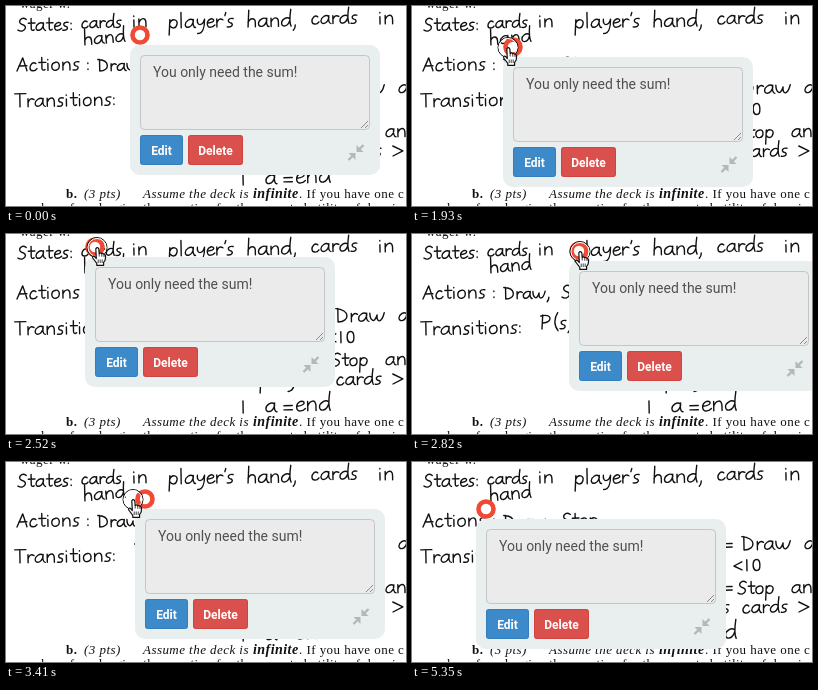
An HTML page with a canvas for the animation above (5.44 s loop, 400 px wide and 200 px high).

```html
<!DOCTYPE html>
<html lang="en">
<head>
<meta charset="utf-8">
<title>Draggable note</title>
<style>
html, body { margin: 0; width: 100%; height: 100%; overflow: hidden; background: #fff; }
canvas { display: block; width: 400px; height: 200px; }
</style>
</head>
<body>
<canvas id="stage" width="400" height="200"></canvas>
<script>
const ctx = document.getElementById('stage').getContext('2d');
const LOOP = 5440;
const STEP = 148;
const PRESS = 1640;
const RELEASE = 4160;
const SERIF = '"Liberation Serif", serif';
const SANS = 'Roboto, sans-serif';

// Pen strokes: advance and path, baseline at y = 0
const bowl = 'M8-7C5-10 0-6 0-3C0 1 6 1 8-6';
const pen = {
  a: [11, bowl + 'M8-8C7-4 8 0 10 0'],
  c: [9, 'M6-7C3-10 0-5 0-3C0 1 5 1 7-2'],
  d: [11, bowl + 'M9-16C8-10 7-4 9 0'],
  e: [9, 'M1-4C10-5 7-9 4-8C-1-6 0 1 4 0Q6 0 8-2'],
  h: [11, 'M2-16L1 0M1-4C3-9 8-9 8-4V0'],
  i: [5, 'M1-7V0M1-11V-10.5'],
  l: [5, 'M1-15V0'],
  n: [11, 'M1-8V0M1-4C3-9 8-10 8-4V0'],
  o: [10, 'M4-8C-2-7-1 1 4 0C9-1 8-9 4-8'],
  p: [11, 'M1-8L0 7M1-5C3-10 9-8 8-4C7 1 3 1 1-2'],
  r: [8, 'M1-8V0M1-4C2-7 4-9 7-7'],
  s: [8, 'M6-8C1-9 0-5 3-4C7-3 5 1 0 0'],
  t: [8, 'M3-13V-2C3 0 5 0 6-1M0-8H7'],
  w: [16, 'M0-8C0-1 4 3 7-6C6 1 11 3 14-8'],
  y: [10, 'M1-8C0-1 6-1 8-8C8 0 6 6 1 6'],
  A: [13, 'M0 0L6-13L10 0M2-5H10'],
  D: [14, 'M2-13V0C14 0 14-12 0-13'],
  P: [13, 'M2-14L1 0M0-13C12-16 12-6 2-6'],
  S: [11, 'M9-12C4-16-1-9 4-7C12-5 6 3 0-1'],
  T: [12, 'M5-13V0M0-13H11'],
  0: [9, 'M4-11C-1-11-1 0 4 0C8 0 8-11 4-11'],
  1: [8, 'M2-11V0'],
  "'": [3, 'M2-14L1-11'],
  ',': [5, 'M2-1Q2 2 0 4'],
  ':': [5, 'M1-7V-6.5M1-1V-.5'],
  '(': [6, 'M4-16C0-10 0-3 4 2'],
  '=': [10, 'M0-6H8M0-2H8'],
  '<': [11, 'M8-9L0-5L8-1'],
  '>': [12, 'M0-10L10-5L0 0']
};
for (const key in pen) pen[key][1] = new Path2D(pen[key][1]);

function write(text, x, y, size = 1, slope = -0.02) {
  ctx.save();
  ctx.translate(x, y);
  ctx.rotate(slope);
  ctx.scale(size, size);
  ctx.strokeStyle = '#111';
  ctx.lineWidth = 1.4 / size;
  ctx.lineCap = ctx.lineJoin = 'round';
  for (const ch of text) {
    const [advance, path] = pen[ch];
    ctx.stroke(path);
    ctx.translate(advance, 0);
  }
  ctx.restore();
}

function print(text, x, y, font, color, align = 'left', spacing = 0) {
  ctx.font = font;
  ctx.fillStyle = color;
  ctx.textAlign = align;
  ctx.letterSpacing = spacing + 'px';
  ctx.fillText(text, x, y);
}

function typeset(text, x, y, style = '', size = 13, align = 'left') {
  print(text, x, y, `${style} ${size}px ${SERIF}`, '#111', align, 0.45);
}

function drawPage() {
  ctx.fillStyle = '#fff';
  ctx.fillRect(0, 0, 400, 200);

  typeset('wager w.', 14, 2);
  write('States:', 12, 25, 0.95);
  write('cards', 76, 22, 0.87);
  write('in', 127, 21, 1);
  write('player\'s', 163, 22, 1.02);
  write('hand,', 241, 21, 1.05);
  write('cards', 306, 18, 1);
  write('in', 373, 18, 1.05);
  write('hand', 78, 39, 0.98, -0.09);

  write('Actions', 11, 65, 1);
  write(':', 81, 64);
  write('Draw,', 92, 65, 0.88);
  write('Stop', 150, 64, 0.95);

  write('Transitions:', 9, 101, 1.01);
  write('P(s,', 129, 95, 1);

  write('=', 313, 87, 0.9);
  write('Draw', 330, 88, 1.03);
  write('a', 393, 87, 1);
  write('<10', 322, 109, 1);
  write('=', 313, 130, 0.9);
  write('Stop', 326, 132, 0.95);
  write('an', 380, 131, 1);
  write('player\'s', 254, 152, 1);
  write('cards', 331, 151, 0.98);
  write('>', 387, 150, 1);
  write('1', 235, 179, 1.1);
  write('a', 260, 178, 1.1);
  write('=', 278, 178, 1.05);
  write('end', 290, 177, 1.18);

  typeset('b.', 60, 191.5, 'bold');
  typeset('(3 pts)', 78, 191.5, 'italic');
  typeset('Assume the deck is', 137, 191.5, 'italic');
  typeset('infinite', 247, 191.5, 'italic bold', 14);
  typeset('. If you have one c', 293, 191.5);
  typeset('an infinite number of cards, give the equation for the expected utility of drawing',
    404, 206, '', 13, 'right');
}

function box(x, y, w, h, r, fill, edge) {
  ctx.beginPath();
  ctx.roundRect(x, y, w, h, r);
  ctx.fillStyle = fill;
  ctx.fill();
  if (!edge) return;
  ctx.beginPath();
  ctx.roundRect(x + 0.5, y + 0.5, w - 1, h - 1, r);
  ctx.strokeStyle = edge;
  ctx.lineWidth = 1;
  ctx.stroke();
}

function circle(x, y, r, color, width) {
  ctx.beginPath();
  ctx.arc(x, y, r, 0, Math.PI * 2);
  ctx.strokeStyle = color;
  ctx.lineWidth = width;
  ctx.stroke();
}

function button(label, x, w, fill, edge) {
  box(x, 90, w, 30, 3, fill, edge);
  print(label, x + w / 2, 110, `bold 12px ${SANS}`, '#fff', 'center');
}

const grip = new Path2D('M231 83L238 76M235 83L238 80');
const arrowHead = new Path2D('M226.5 100V107H233.5Z');
const arrowTail = new Path2D('M228 105.5L233.5 100');

function shrinkArrow(turn) {
  ctx.save();
  if (turn) {
    ctx.translate(452, 215);
    ctx.rotate(Math.PI);
  }
  ctx.fillStyle = ctx.strokeStyle = '#b4b8b9';
  ctx.lineWidth = 2.4;
  ctx.fill(arrowHead);
  ctx.stroke(arrowTail);
  ctx.restore();
}

// The panel hangs from its ring marker
function drawNote(x, y) {
  ctx.save();
  ctx.translate(x - 10, y + 10);
  box(0, 0, 250, 130, 10, '#e9eeef');
  box(10, 10, 230, 75, 4, '#ebebeb', '#c4c6c6');
  print('You only need the sum!', 23, 32, `14px ${SANS}`, '#505050');
  ctx.strokeStyle = '#8a8a8a';
  ctx.lineWidth = 1;
  ctx.stroke(grip);
  button('Edit', 10, 43, '#3d8acb', '#357ebd');
  button('Delete', 58, 55, '#d9504c', '#d2433f');
  shrinkArrow(false);
  shrinkArrow(true);
  ctx.restore();

  box(x - 6, y - 6, 12, 12, 6, '#fff');
  circle(x, y, 7.5, '#f04a34', 4.6);
}

const palm = new Path2D('M3.8 1.8Q5.3-.4 6.8 1.8L7.2 6.5Q8.8 5 9.8 6.8Q11.3 5.8 12 7.6' +
  'Q13.6 7.2 13.6 9.2L13.2 13L11.6 15.5V18.4H4.8V16.4L.7 11Q.2 8.6 2.4 9.4L4.3 11.5Z');
const fingers = new Path2D('M7.2 6.5V9.5M9.8 6.8V9.7M12 7.6V10M6.2 12.5V16M8.2 12.5V16M10.2 12.5V16');

function drawHand([x, y], pressed) {
  ctx.save();
  ctx.translate(x, y);
  if (pressed) {
    circle(5, 0.5, 10, '#111', 1);
    circle(5, 0.5, 9, '#fff', 1);
  }
  ctx.lineJoin = 'round';
  ctx.fillStyle = '#fff';
  ctx.strokeStyle = '#111';
  ctx.lineWidth = 1.2;
  ctx.fill(palm);
  ctx.stroke(palm);
  ctx.lineWidth = 0.8;
  ctx.stroke(fingers);
  ctx.restore();
}

// Drag stops: ring x, ring y, how far the hand runs ahead
const drag = [
  [125, 32, -3], [114, 37, -3], [101, 41, -3], [76, 40, -5],
  [55, 35, 0], [62, 21, 3], [89, 13, 4], [132, 8, 6],
  [167, 17, 3], [186, 29, 0], [180, 38, -4], [162, 39, -6],
  [139, 37, -10], [105, 40, -8], [78, 45, -3], [74, 47, 0]
];

function ringAt(t) {
  if (t < PRESS) return [134, 29, 0];
  // slack absorbs the rounding of each hold to 10 ms
  return drag[Math.min(drag.length - 1, Math.floor((t - PRESS + 9) / STEP))];
}

function handAt(t, [x, y, lead]) {
  if (t < 740 || t >= 4450) return null;
  if (t < 1340) {
    const k = Math.floor((t - 740) / 150) / 4;
    const p = k * (2 - k);
    return [107 + 20 * p, 5 + 24 * p];
  }
  if (t < RELEASE) return [x - 7 + lead, y];
  return t < 4305 ? [63, 33] : [61, 15];
}

function draw(t) {
  const ring = ringAt(t);
  const hand = handAt(t, ring);
  drawPage();
  drawNote(ring[0], ring[1]);
  if (hand) drawHand(hand, t >= PRESS && t < RELEASE);
}

const start = performance.now();
function tick() {
  draw((performance.now() - start) % LOOP);
  requestAnimationFrame(tick);
}
tick();
</script>
</body>
</html>
```
